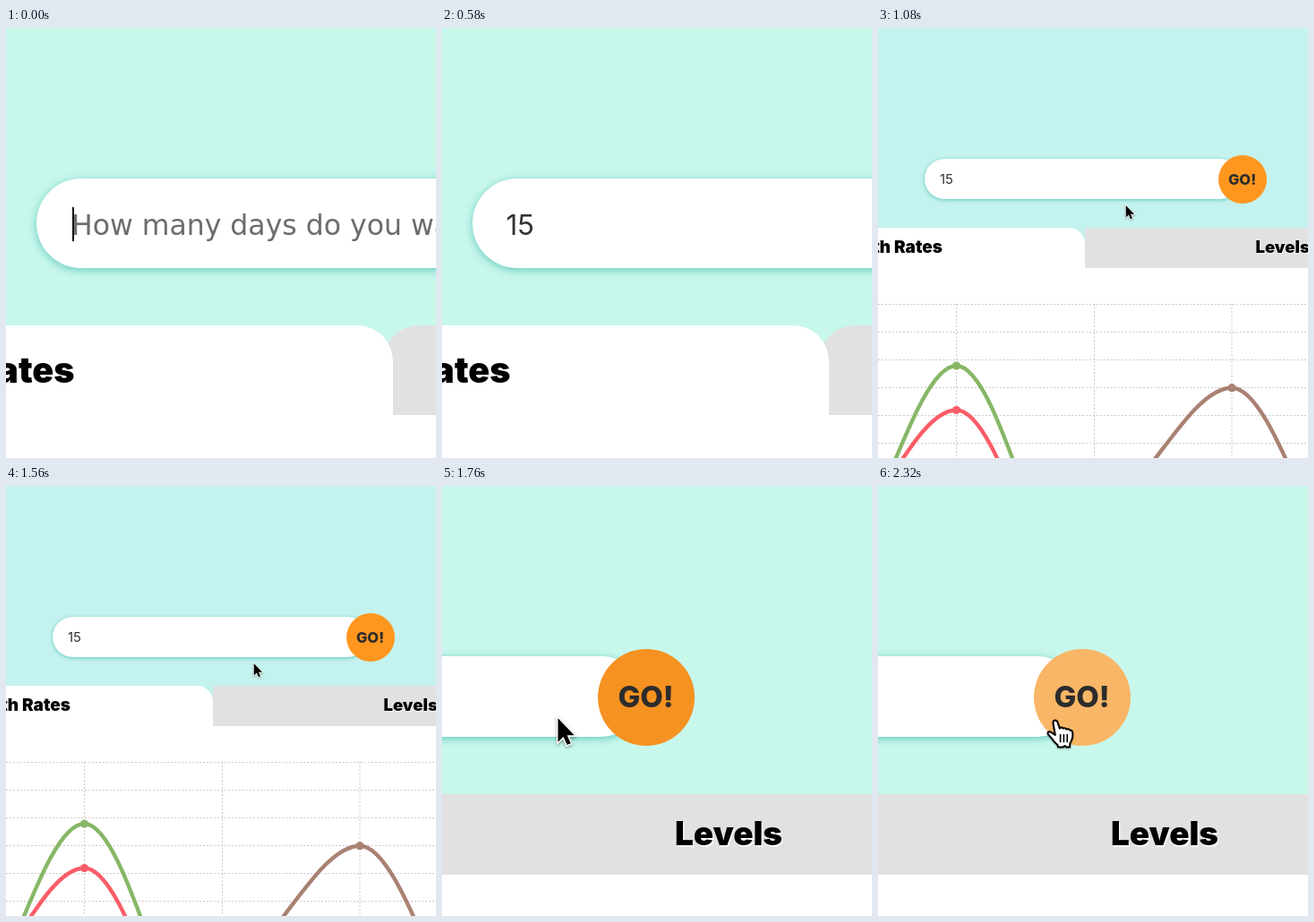
Animation of 480x480 px, one loop 2380 ms. Source, as an HTML page with a canvas:

```html
<!DOCTYPE html>
<html lang="en">
<head>
<meta charset="utf-8">
<title>Days search</title>
<style>
  html, body { margin: 0; height: 100%; overflow: hidden; background: #c8f7ec; }
  canvas { display: block; width: 100vw; height: 100vh; }
</style>
</head>
<body>
<canvas id="stage" width="480" height="480"></canvas>
<script>
const ctx = document.getElementById('stage').getContext('2d');
const LOOP = 2380;
const INK = '#2c2c2c';
const GREY = '#e1e1e1';

const ARROW = new Path2D('M0 0V15.6L3.6 12.3L6 17.6L8.4 16.6L6 11.3H10.8Z');
const HAND = new Path2D(
  'M7.6 4.6Q7 1.2 9.6 1Q12 1 12.8 4L14.8 10Q16.8 8 18.6 10Q20.8 8.8 22.6 11' +
  'Q24.8 9.8 26.4 12Q29 12 29.4 15.4Q29.8 20 27.8 24L26.2 27V31H22.5L20.5 29.5L18.5 31' +
  'H13L12.4 28.4Q8 25 5.8 21L1.8 16.6Q.6 13.6 4 13.6L9.8 17.4Z');
const HAND_LINES = new Path2D('M15.6 17V25M19.4 17V25M23.2 17V25');

// time, x, y of the pointer's hot spot
const POINTER = [
  [1580, 54, 254], [1840, 161, 257.5], [1860, 172, 258.5],
  [1900, 181, 260], [2000, 189.5, 261], [2140, 195, 261.7], [2320, 198, 262]
];

function rect(x, y, w, h, color) {
  ctx.fillStyle = color;
  ctx.fillRect(x, y, w, h);
}

function roundRect(x, y, w, h, radii, color) {
  ctx.beginPath();
  ctx.roundRect(x, y, w, h, radii);
  ctx.fillStyle = color;
  ctx.fill();
}

function disc(x, y, r, color) {
  ctx.beginPath();
  ctx.arc(x, y, r, 0, Math.PI * 2);
  ctx.fillStyle = color;
  ctx.fill();
}

function text(str, x, y, size, weight, color, align = 'left', family = 'Inter') {
  ctx.font = `${weight} ${size}px "${family}", sans-serif`;
  ctx.textAlign = align;
  ctx.fillStyle = color;
  ctx.fillText(str, x, y);
}

function background(color, whiteTop) {
  rect(0, 0, 480, 480, color);
  rect(0, whiteTop, 480, 480 - whiteTop, '#fff');
}

function field(x, y, w, h, scale) {
  ctx.save();
  ctx.shadowColor = 'rgba(0, 160, 145, 0.5)';
  ctx.shadowBlur = 4.2 * scale;
  ctx.shadowOffsetY = scale;
  roundRect(x, y, w, h, h / 2, '#fff');
  ctx.restore();
}

function tabLabel(str, x, y, size, align) {
  text(str, x + size / 30, y + size / 22, size, 900, '#fff', align);
  text(str, x, y, size, 900, '#000', align);
}

function arrow(x, y, scale) {
  ctx.save();
  ctx.translate(x + scale * 0.8, y + scale * 1.6);
  ctx.scale(scale, scale);
  ctx.lineJoin = 'miter';
  ctx.lineWidth = 1.8;
  ctx.strokeStyle = '#fff';
  ctx.shadowColor = 'rgba(0, 0, 0, 0.35)';
  ctx.shadowBlur = 2 * scale;
  ctx.shadowOffsetY = scale;
  ctx.stroke(ARROW);
  ctx.shadowColor = 'transparent';
  ctx.fillStyle = '#000';
  ctx.fill(ARROW);
  ctx.restore();
}

function hand(x, y) {
  ctx.save();
  ctx.translate(x - 10, y - 1.4);
  ctx.lineJoin = ctx.lineCap = 'round';
  ctx.lineWidth = 2;
  ctx.strokeStyle = '#000';
  ctx.fillStyle = '#fff';
  ctx.shadowColor = 'rgba(0, 0, 0, 0.4)';
  ctx.shadowBlur = 3;
  ctx.shadowOffsetY = 1.5;
  ctx.fill(HAND);
  ctx.shadowColor = 'transparent';
  ctx.stroke(HAND);
  ctx.lineWidth = 1.6;
  ctx.stroke(HAND_LINES);
  ctx.restore();
}

function typingScene(t) {
  background('#c8f7ec', 432);
  field(34, 168, 560, 100, 2.2);
  roundRect(421, 332, 100, 100, [40, 0, 0, 0], GREY);
  roundRect(-60, 332, 492, 100, [0, 40, 0, 0], '#fff');
  text('Growth Rates', 76.5, 396, 39.5, 900, '#000', 'right');

  const typed = t < 200 ? '' : t < 440 ? '1' : '15';
  if (typed) text(typed, 71.5, 230.5, 31.5, 400, '#333');
  else text('How many days do you want', 73, 230.5, 31.5, 400, '#6c6c6c', 'left', 'DejaVu Sans');

  const caretOn = t < 140 || (t >= 200 && t < 420) || (t >= 440 && t < 580);
  if (caretOn) rect([74, 86, 104][typed.length], 200, 2, 38, '#111');
}

// A peak with level tangents, falling by the given depths to its neighbours.
function peak(x, y, left, right, color) {
  const step = 153.5, h = step / 3;
  ctx.beginPath();
  ctx.moveTo(x - step, y + left);
  ctx.bezierCurveTo(x - 2 * h, y + left, x - h, y, x, y);
  ctx.bezierCurveTo(x + h, y, x + 2 * h, y + right, x + step, y + right);
  ctx.strokeStyle = color;
  ctx.lineWidth = 4.4;
  ctx.stroke();
  disc(x, y, 4.6, color);
}

function grid() {
  ctx.save();
  ctx.setLineDash([2, 2]);
  ctx.lineWidth = 1;
  ctx.strokeStyle = '#cbcbcb';
  ctx.beginPath();
  for (let i = 0; i < 6; i++) {
    const y = Math.floor(308 + i * 31.1) + 0.5;
    ctx.moveTo(0, y);
    ctx.lineTo(480, y);
  }
  for (const x of [87.5, 241.5, 395]) {
    ctx.moveTo(x, 308);
    ctx.lineTo(x, 480);
  }
  ctx.stroke();
  ctx.restore();
}

function overviewScene() {
  background('#c4f2ee', 268);
  field(52, 146, 352, 45, 1);
  disc(407, 169, 27, '#ff961e');
  text('GO!', 406.5, 174.5, 16.5, 800, INK, 'center');
  text('15', 69, 174.3, 15, 400, '#333');

  roundRect(231, 223, 260, 45, [4, 0, 0, 0], GREY);
  roundRect(-60, 223, 291, 45, [0, 18, 0, 0], '#fff');
  text('Growth Rates', 72, 251, 19, 900, '#000', 'right');
  tabLabel('Levels', 421.5, 251, 18.5, 'left');

  grid();
  peak(87.5, 377, 251, 284, '#87b766');
  peak(87.5, 426.5, 160, 253, '#fa5d68');
  peak(395, 401.7, 135, 232, '#aa8172');
  arrow(276, 196.5, 0.87);
}

function pointerAt(t) {
  let i = 1;
  while (i < POINTER.length - 1 && t > POINTER[i][0]) i++;
  const [t0, x0, y0] = POINTER[i - 1], [t1, x1, y1] = POINTER[i];
  const u = Math.min(1, (t - t0) / (t1 - t0));
  return [x0 + (x1 - x0) * u, y0 + (y1 - y0) * u];
}

function buttonScene(t) {
  const hover = t >= 1860;
  background('#c8f7ec', 434);
  field(-200, 190, 423, 90, 2);
  rect(0, 344, 480, 90, GREY);
  disc(228, 236, 54, hover ? '#f8b666' : '#f59222');
  text('GO!', 227.5, 246.5, 33, 800, INK, 'center');
  tabLabel('Levels', 320, 401, 36.8, 'center');
  (hover ? hand : arrow)(...pointerAt(t), 1.7);
}

function draw() {
  const t = performance.now() % LOOP;
  if (t < 780) typingScene(t);
  else if (t < 1580) overviewScene();
  else buttonScene(Math.floor(t / 20) * 20);
  requestAnimationFrame(draw);
}
draw();
</script>
</body>
</html>
```
